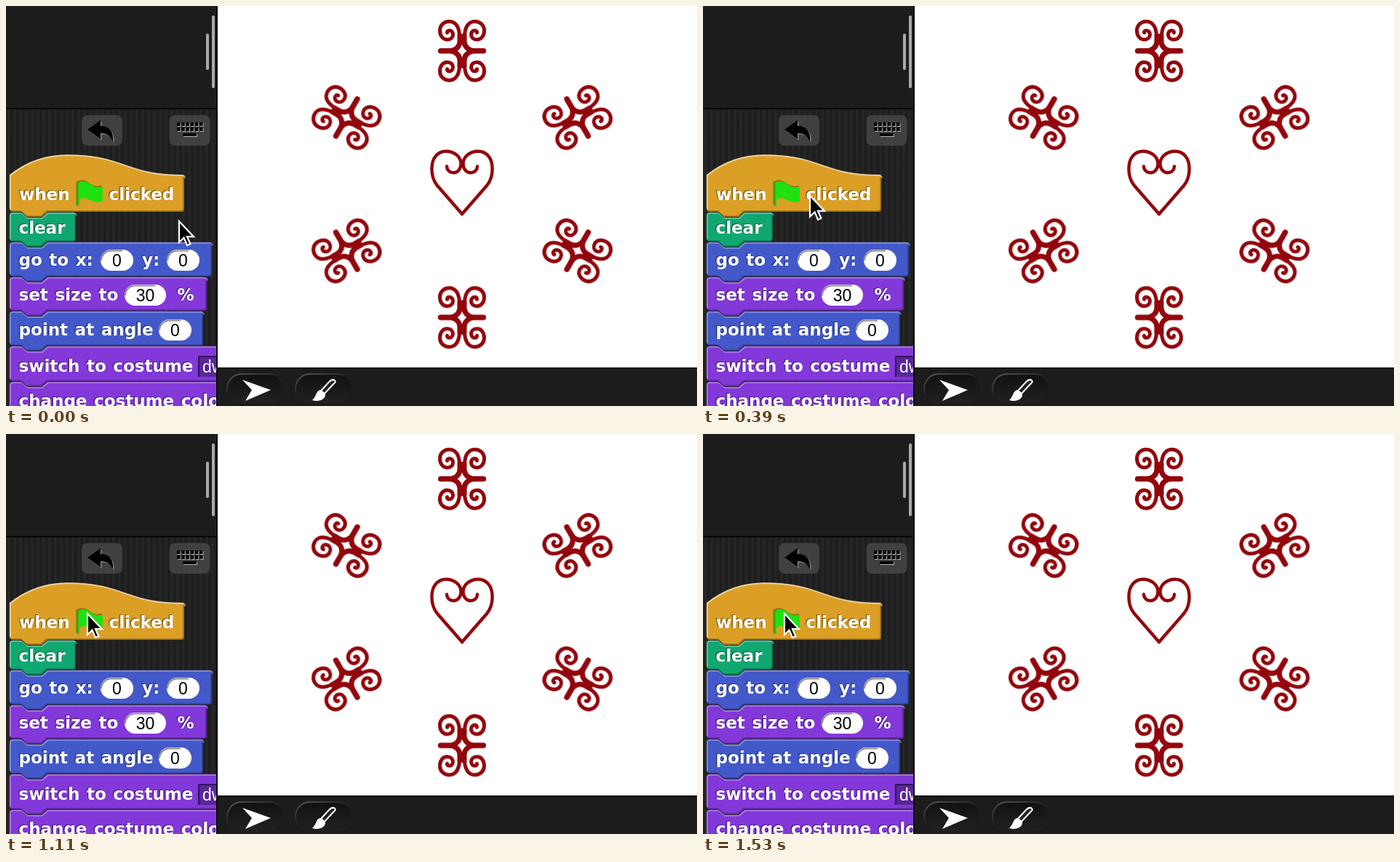
These frames come from a looping animation (950x550 px, 1.65 s). An HTML page:

```html
<!DOCTYPE html>
<html lang="en">
<head>
<meta charset="utf-8">
<title>Block script</title>
<style>
  html, body { margin: 0; width: 100%; height: 100%; overflow: hidden; background: #1c1c1c; }
  svg { display: block; }
  .label { font: bold 23px "DejaVu Sans", Verdana, sans-serif; word-spacing: 1.6px; }
  .value { font: 23px "Liberation Sans", Arial, sans-serif; }

  #cursor { animation: move 1650ms infinite; }
  @keyframes move {
    0% { transform: translate(238px, 296px); animation-timing-function: steps(18, end); }
    32.727%, 100% { transform: translate(112px, 247px); }
  }

  #blocks { animation: glow 1650ms step-end infinite; }
  @keyframes glow {
    0%, 81.75% { filter: none; }
    69% { filter: drop-shadow(0 0 2px #99ffd5) drop-shadow(0 0 22px #7fe0b8); }
  }

  /* The stage is cleared, then one stamp lands every 30 ms. */
  .stamp { animation: 1650ms step-end infinite; }
  @keyframes stamp1 { 0%, 70.85% { opacity: 1; } 69% { opacity: 0; } }
  @keyframes stamp2 { 0%, 72.7% { opacity: 1; } 69% { opacity: 0; } }
  @keyframes stamp3 { 0%, 74.5% { opacity: 1; } 69% { opacity: 0; } }
  @keyframes stamp4 { 0%, 76.3% { opacity: 1; } 69% { opacity: 0; } }
  @keyframes stamp5 { 0%, 78.15% { opacity: 1; } 69% { opacity: 0; } }
  @keyframes stamp6 { 0%, 79.95% { opacity: 1; } 69% { opacity: 0; } }
</style>
</head>
<body>
<svg width="950" height="550" viewBox="0 0 950 550">
  <defs>
    <linearGradient id="groove">
      <stop offset="0" stop-color="#1b1b1b"/>
      <stop offset=".5" stop-color="#282828"/>
      <stop offset="1" stop-color="#1b1b1b"/>
    </linearGradient>
    <pattern id="stripes" width="8" height="8" patternUnits="userSpaceOnUse">
      <rect width="8" height="8" fill="url(#groove)"/>
    </pattern>
    <linearGradient id="tabFill" x2="0" y2="1">
      <stop offset="0" stop-color="#111"/>
      <stop offset="1" stop-color="#222"/>
    </linearGradient>
    <linearGradient id="tabEdge" x2=".7" y2="1">
      <stop offset="0" stop-color="#585858"/>
      <stop offset=".5" stop-color="#1f1f1f"/>
      <stop offset="1" stop-color="#1c1c1c"/>
    </linearGradient>
    <clipPath id="pane"><rect y="142" width="289" height="408"/></clipPath>

    <g id="horn" fill="none" stroke="#92060c" stroke-linecap="round">
      <path stroke-width="7" d="M-29.5 0H-18C-9 0-3-6-3-13V-21"/>
      <path stroke-width="5" d="M-3.500-19C-3.500-33-9-40.500-17.500-40.500C-25-40.500-30.500-35-30.500-28C-30.500-20.500-26-15.500-20.500-15.500C-15.500-15.500-12.500-18.500-12.500-22.500C-12.500-26-15-28-17.500-28C-19.500-28-20.800-26.800-20.500-25"/>
    </g>
    <g id="horns">
      <use href="#horn"/>
      <use href="#horn" transform="scale(-1 1)"/>
      <use href="#horn" transform="scale(1 -1)"/>
      <use href="#horn" transform="scale(-1 -1)"/>
    </g>
    <path id="lobe" fill="none" stroke="#92060c" stroke-width="4.400" stroke-linecap="round"
      d="M0 41L-34 2C-39-4-41.600-12-41.600-21C-41.600-36-33.500-45.300-22-45.300C-10-45.300-1.500-37-1.500-28C-1.500-20.500-6.500-15.800-12-15.800C-17.500-15.800-21-20-21-24.500"/>
    <path id="undo" d="M112 170L130 157V165C142 165 148 172 147 186C142 177 138 175 130 175V183Z"/>
    <path id="keys" d="M235 162.500H271M235 169.500H271" stroke-width="5" stroke-dasharray="4.600 1.600"/>
    <path id="space" d="M243 177H262" stroke-width="4"/>
    <rect id="tab" x="304" y="506" width="78" height="41" rx="20" fill="url(#tabFill)" stroke="url(#tabEdge)" stroke-width="2"/>
  </defs>

  <rect width="950" height="550" fill="#1c1c1c"/>
  <rect y="142" width="289" height="408" fill="url(#stripes)"/>
  <path d="M0 141H290" stroke="#050505" stroke-width="2"/>
  <rect x="275" y="38" width="4" height="50" rx="2" fill="#aaa"/>
  <rect x="283" y="13" width="4" height="100" rx="2" fill="#aaa"/>

  <g fill="#404040">
    <rect x="104" y="150" width="56" height="42" rx="8"/>
    <rect x="224.500" y="150" width="56" height="42" rx="8"/>
  </g>
  <use href="#undo" x="1.500" y="1.500" fill="#888"/>
  <use href="#undo"/>
  <g stroke="#b4b4b4"><use href="#keys" x="1" y="1"/><use href="#space" x="1" y="1"/></g>
  <g stroke="#050505"><use href="#keys"/><use href="#space"/></g>

  <g clip-path="url(#pane)"><g id="blocks"></g></g>

  <rect x="289" width="2" height="550" fill="#050505"/>
  <rect x="291" width="659" height="497" fill="#fff"/>
  <rect x="291" y="497" width="659" height="2" fill="#050505"/>
  <g id="stage"></g>

  <use href="#tab"/>
  <use href="#tab" x="94"/>
  <path d="M325 514L364 528L329 543L338 528Z" fill="#fff"/>
  <path d="M452 515C449 512 446 515 444 517L433 529L438 533L449 521C452 518 454 517 452 515Z" fill="#222" stroke="#fff" stroke-width="2"/>
  <path d="M432 528C426 529 427 537 421 542C430 545 440 541 439 533Z" fill="#fff"/>

  <g id="cursor">
    <path d="M0 0V29L6.600 22.600L11 33L15.400 31.200L11 21.200H20Z" fill="#000" stroke="#fff" stroke-width="2.200"/>
  </g>
</svg>
<script>
  const GOLD = '#db9f25', GREEN = '#11a770', BLUE = '#4359ca', PURPLE = '#8338d9';

  const label = (x, y, s) =>
    `<text class="label" x="${x - 1.5}" y="${y - 1.5}" fill="#000" opacity=".4">${s}</text>
     <text class="label" x="${x}" y="${y}" fill="#fff">${s}</text>`;

  const slot = (x, y, w, s) =>
    `<rect x="${x}" y="${y}" width="${w}" height="29" rx="14.5" fill="#fff"/>
     <path d="M${x + 1} ${y + 15}a13.5 13.5 0 0 1 13.5 -13.5H${x + w - 15}" fill="none" stroke="#000" stroke-opacity=".45" stroke-width="2"/>
     <text class="value" x="${x + w / 2}" y="${y + 23}" text-anchor="middle">${s}</text>`;

  // A block body with a lit top-left edge and a shaded bottom-right edge.
  function block(right, y, bottom, color, content, top) {
    const upper = top || `M5 ${bottom - 4}V${y + 4}q0 -4 4 -4H21l8 7H49l8 -7H${right - 4}q4 0 4 4`;
    const lower = `V${bottom - 4}q0 4 -4 4H57l-8 7H29l-8 -7H9q-4 0 -4 -4`;
    return `<path d="${upper}${lower}Z" fill="${color}"/>
      <g fill="none" stroke-width="2">
        <path d="${upper}" transform="translate(.8 .8)" stroke="#fff" stroke-opacity="${top ? .55 : .32}"/>
        <path d="M${right} ${y + 4}${lower}" transform="translate(-.8 -.8)" stroke="#000" stroke-opacity=".3"/>
      </g>${content}`;
  }

  const flagPath = 'M98 243C108 238 114 243 119 247C123 249.500 128 250 133 248V268C127 271 121 270 116 267C111 264 106 263 101 266V275H98Z';
  const flag = `<path d="${flagPath}" transform="translate(-1.5 -1.5)" opacity=".35"/>
    <path d="${flagPath}" fill="#1fe011"/><path d="M98.500 243V275" stroke="#2fae18" stroke-width="2"/>`;

  const hat = 'M5 279V232A125.400 125.400 0 0 1 84 204.500C163 204.500 163 232 241 232q4 0 4 4';
  const menu = `<rect x="265" y="481" width="60" height="29" fill="#5a2699"/>
    <path d="M265 510V482H300" fill="none" stroke="#32125c" stroke-width="2"/>
    <text class="value" x="270" y="504" fill="#fff">dwennimmen</text>`;

  const blocks = [
    block(245, 232, 283, GOLD, label(18, 267, 'when') + flag + label(141.5, 267, 'clicked'), hat),
    block(96, 284, 324, GREEN, label(17.5, 313, 'clear')),
    block(283, 325, 372, BLUE, label(17.5, 357, 'go to x:') + slot(130, 335, 45, 0) + label(187, 357, 'y:') + slot(221, 335, 45, 0)),
    block(276, 373, 419, PURPLE, label(17.5, 405, 'set size to') + slot(163, 383, 57, 30) + label(235.5, 405, '%')),
    block(271, 420, 467, BLUE, label(17.5, 453, 'point at angle') + slot(210, 431, 45, 0)),
    block(400, 468, 516, PURPLE, label(17.5, 503, 'switch to costume') + menu),
    block(400, 517, 565, PURPLE, label(17.5, 551, 'change costume color')),
  ];
  document.getElementById('blocks').innerHTML = blocks.reverse().join('');

  // Six horn stamps counter-clockwise from the top, then the heart.
  let stage = '';
  for (let i = 0; i < 6; i++) {
    stage += `<g ${i ? `class="stamp" style="animation-name:stamp${i}"` : ''}>
      <use href="#horns" transform="translate(627 245) rotate(${-60 * i}) translate(0 -183.300)"/></g>`;
  }
  stage += `<g class="stamp" style="animation-name:stamp6"><g transform="translate(627 245)">
    <use href="#lobe"/><use href="#lobe" transform="scale(-1 1)"/></g></g>`;
  document.getElementById('stage').innerHTML = stage;
</script>
</body>
</html>
```
